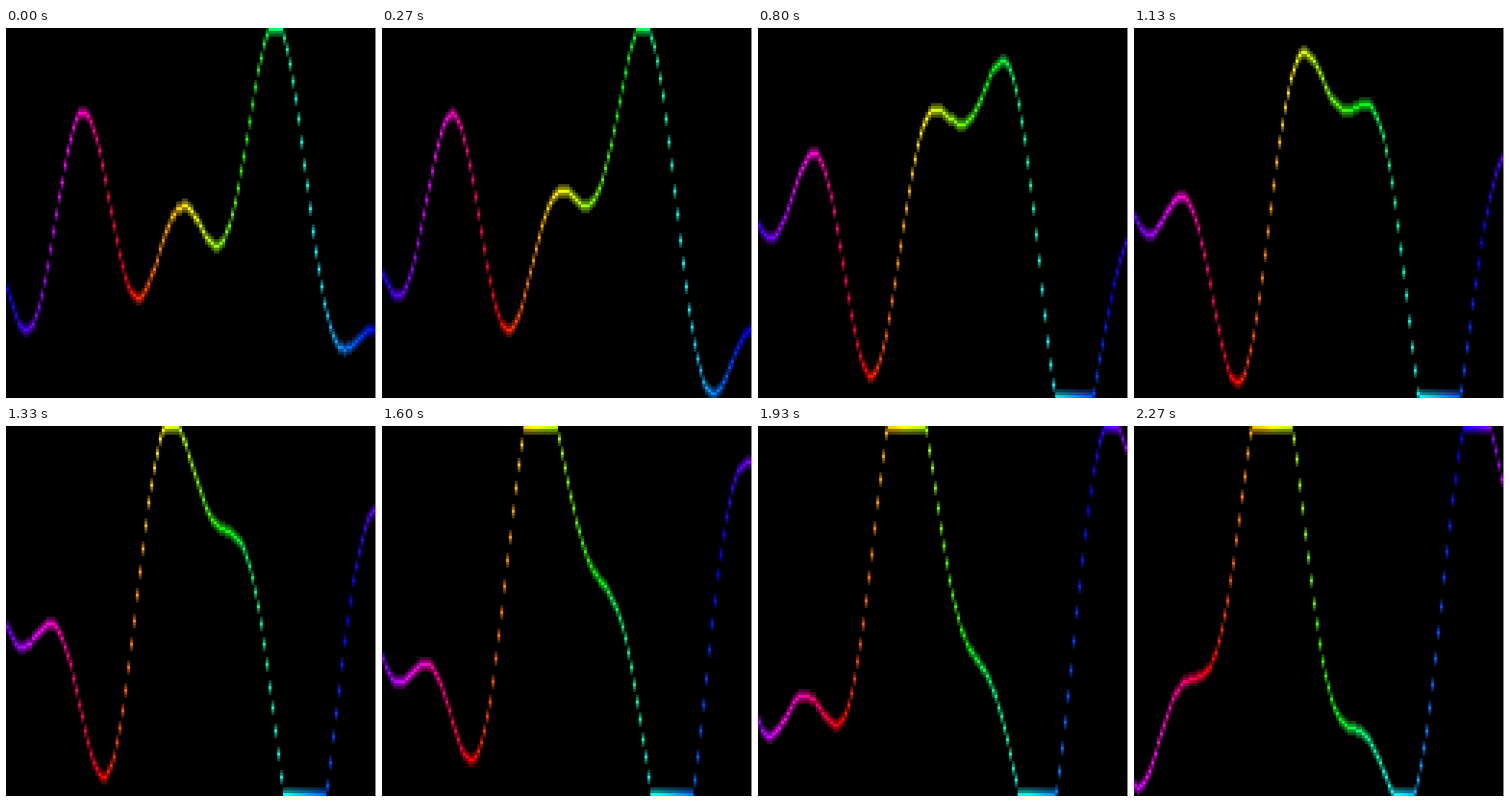
These frames come from a looping animation (513 px wide and 512 px high, 2.34 s). An HTML page with a canvas:

```html
<!DOCTYPE html>
<html lang="en">
<head>
<meta charset="utf-8">
<title>Rainbow wave</title>
<style>
  html, body { margin: 0; width: 100%; height: 100%; overflow: hidden; background: #bbb; }
  canvas { display: block; }
</style>
</head>
<body>
<canvas id="stage" width="513" height="512"></canvas>
<script>
const ctx = document.getElementById('stage').getContext('2d');

const CELL = 4;
const GRID = 128;
const SIZE = CELL * GRID;
const STEPS = 35;
const LOOP = 2340;

// Brightness by distance from the curve, outermost first.
const GLOW = [0.3, 0.55, 1];

// Each wave: amplitude (px), wave number (rad/px), start phase, phase per step.
const WAVES = [
  { amp: 90, k: 0.0464, phase: -1.756, speed: 0.0652 },
  { amp: 169, k: 0.02244, phase: -5.61, speed: 0.1271 },
  { amp: 119, k: 0.01687, phase: -1.724, speed: 0.0591 }
];

function height(x, step) {
  return WAVES.reduce(
    (y, w) => y + w.amp * Math.cos(w.k * x + w.phase + w.speed * step),
    SIZE / 2
  );
}

function hsv(hue, value) {
  const channel = n => {
    const k = (n + hue / 60) % 6;
    const c = 1 - Math.max(0, Math.min(k, 4 - k, 1));
    return Math.round(255 * value * c);
  };
  return `rgb(${channel(5)},${channel(3)},${channel(1)})`;
}

function draw(step) {
  ctx.fillStyle = '#000';
  ctx.fillRect(0, 0, SIZE, SIZE);
  for (let col = 0; col < GRID; col++) {
    const x = (col + 0.5) * CELL;
    const row = Math.max(0, Math.min(GRID - 1, Math.floor(height(x, step) / CELL)));
    const hue = (240 + 360 * x / SIZE + 1.3 * step) % 360;
    GLOW.forEach((value, i) => {
      const reach = GLOW.length - 1 - i;
      ctx.fillStyle = hsv(hue, value);
      ctx.fillRect(col * CELL, (row - reach) * CELL, CELL, (2 * reach + 1) * CELL);
    });
  }
}

// Steps are 1/15 s long, rounded to hundredths of a second.
function stepAt(time) {
  let step = STEPS - 1;
  while (step > 0 && Math.round(step * 20 / 3) * 10 > time) step--;
  return step;
}

const start = performance.now();

function tick() {
  draw(stepAt((performance.now() - start) % LOOP));
  requestAnimationFrame(tick);
}

tick();
</script>
</body>
</html>
```
